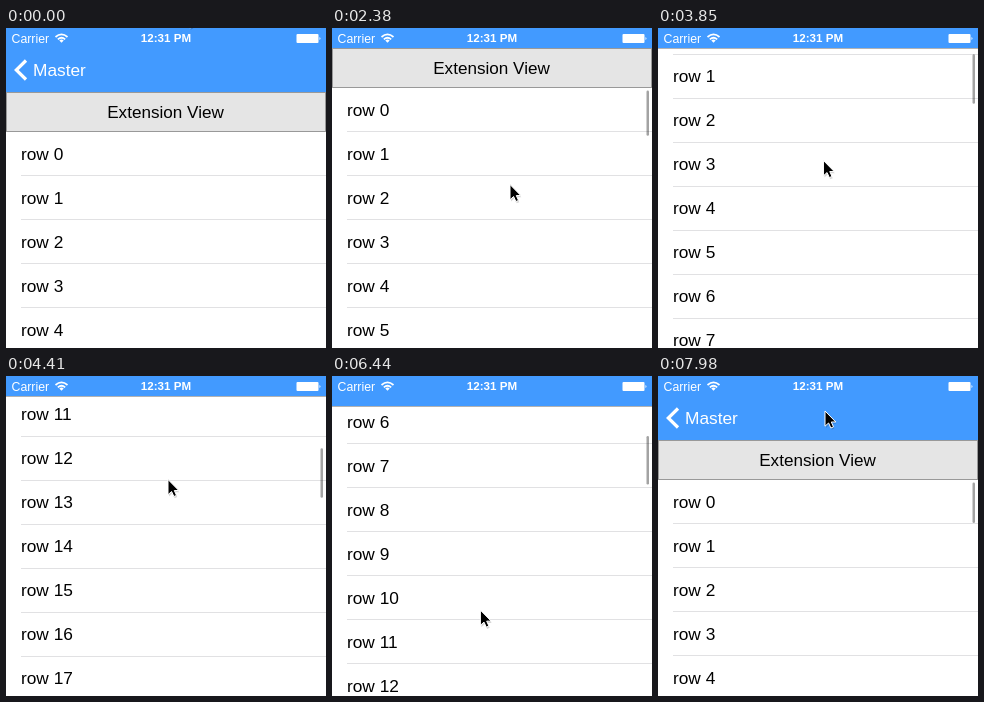
An HTML page that plays this animation: 320x320 px, repeating every 8000 ms.

```html
<!DOCTYPE html>
<html lang="en">
<head>
<meta charset="utf-8">
<title>Collapsing navigation bar</title>
<style>
  html, body { margin: 0; width: 100%; height: 100%; overflow: hidden; background: #fff; }
  svg { display: block; width: 100%; height: 100%; font: 17.3px "Liberation Sans", Arial, sans-serif; }
  .status { font-size: 12.3px; fill: #fff; }
</style>
</head>
<body>
<svg viewBox="0 0 320 320">
  <rect width="320" height="320" fill="#fff"/>
  <g id="lines" stroke="#e1e1e3"></g>
  <g id="labels"></g>
  <rect id="scrollbar" x="314.5" width="2.5" rx="1.25" fill="#000" fill-opacity=".36"/>
  <rect id="hairline" width="320" height="1" fill="#000" fill-opacity=".3"/>
  <g id="extension">
    <rect x=".5" y=".5" width="319" height="39" fill="#e5e5e5" stroke="#999"/>
    <text x="159.5" y="26" text-anchor="middle" font-size="17.1">Extension View</text>
  </g>
  <rect id="navBar" width="320" fill="#429aff"/>
  <g id="navItem" fill="#fff">
    <path d="M20 32.5 10.3 42 20 51.5" fill="none" stroke="#fff" stroke-width="3.2"/>
    <text x="27" y="48">Master</text>
  </g>
  <g class="status">
    <text x="5.5" y="14.5">Carrier</text>
    <text x="160" y="14.3" text-anchor="middle" font-size="11.6" font-weight="bold">12:31 PM</text>
    <path d="M49.5 9Q55.5 3.8 61.5 9M51.8 11.3Q55.5 8.2 59.2 11.3" fill="none" stroke="#fff" stroke-width="1.7"/>
    <path d="M53.3 12.4Q55.5 10.8 57.7 12.4L55.5 14.7Z"/>
    <rect x="290.5" y="6" width="22" height="9" rx="1"/>
    <path d="M313.5 9Q315.5 10.5 313.5 12Z"/>
  </g>
  <g id="cursor">
    <path d="M1 2V17L4.4 13.8 6.7 18.8 9.3 17.6 7 12.8H11.4Z" fill="#000" opacity=".16"/>
    <path d="M0 0V15.2L3.6 12 5.9 17 8.5 15.9 6.3 11H10.8Z" fill="#000" stroke="#fff"/>
  </g>
</svg>
<script>
const LOOP = 8000, STEP = 70, ROW = 44, ROWS = 32, SCREEN = 480;
const BAR = 64, STATUS = 20, EXT = 40;
const RESIST_HIDE = 3.5, RESIST_SHOW = 200;

const clamp = (v, lo = 0, hi = 1) => Math.min(hi, Math.max(lo, v));
const smooth = u => u * u * (3 - 2 * u);
const easeIn = u => u ** 1.5;
const easeOut = u => 1 - (1 - u) ** 3;

// Pointer moves and the scrolling they cause.
const gestures = [
  { from: 140, to: 420, x: 144, y: 297 },
  { from: 700, to: 1540, x: 158, y: 160, scroll: 122.5, ease: easeIn },
  { from: 1540, to: 1680, x: 178, y: 57 },
  { from: 1820, to: 2870, y: 238, scroll: -20 },
  { from: 2870, to: 3360, scroll: 0 },
  { from: 3500, to: 4000, x: 162, y: 103.5 },
  { from: 3500, to: 4954, scroll: 835 },
  { from: 4960, to: 5460, x: 152, y: 370 },
  { from: 4960, to: 6030, scroll: 266.5 },
  { from: 6030, to: 6540, x: 148, y: 219, scroll: 352.7 },
  { from: 6540, to: 6640, scroll: 352.7 },
  { from: 6640, to: 6930, x: 330, y: 200, scroll: 390 },
  { from: 6930, to: 7000, x: 177, y: -19 },
  { from: 7070, to: 7490, x: 170, y: 8 },
  { from: 7630, to: LOOP, x: 167, y: 35, scroll: 0, ease: easeOut }
];

const valueAt = (prop, initial, t) => gestures
  .filter(g => prop in g && t > g.from)
  .reduce((v, { from, to, ease = smooth, [prop]: end }) =>
    v + (end - v) * ease(clamp((t - from) / (to - from))), initial);

// Both directions move the extension first, then the bar.
function collapse(bar, delta) {
  const ext = clamp(bar.ext + delta, 0, EXT);
  const rest = delta - (ext - bar.ext);
  bar.ext = ext;
  bar.nav = clamp(bar.nav + rest, 0, BAR - STATUS);
}

function simulate() {
  const bar = { ext: 0, nav: 0 }, frames = [];
  let hideSlack = RESIST_HIDE, showSlack = RESIST_SHOW, last = 0;
  for (let t = 0; t < LOOP; t += STEP) {
    const scroll = valueAt('scroll', 0, t), delta = scroll - last;
    if (delta > 0 && scroll > 0) {
      const used = Math.min(delta, hideSlack);
      hideSlack -= used;
      showSlack = RESIST_SHOW;
      collapse(bar, delta - used);
    } else if (delta < 0) {
      const used = Math.min(-delta, showSlack);
      showSlack -= used;
      hideSlack = RESIST_HIDE;
      collapse(bar, delta + used);
    }
    // Never leave a gap above the first row.
    collapse(bar, Math.min(0, Math.max(0, scroll) - bar.ext - bar.nav));
    last = scroll;
    frames.push({
      scroll, ext: bar.ext, nav: BAR - bar.nav,
      x: valueAt('x', 178, t), y: valueAt('y', -17, t),
      scrolling: gestures.some(g => 'scroll' in g && t > g.from && t < g.to)
    });
  }
  return frames;
}

const el = id => document.getElementById(id);
const set = (id, attrs) => Object.entries(attrs).forEach(([k, v]) => el(id).setAttribute(k, v));
const moveTo = (id, x, y) => set(id, { transform: `translate(${x} ${y})` });
const eachRow = make => Array.from({ length: ROWS }, (_, i) => make(i, i * ROW)).join('');

el('labels').innerHTML = eachRow((i, y) => `<text x="15" y="${y + 28}">row ${i}</text>`);
el('lines').innerHTML = eachRow((i, y) => `<path d="M15 ${y + 43.5}H320"/>`);

function draw(frame) {
  const nav = Math.round(frame.nav), ext = Math.round(frame.ext);
  const top = BAR + EXT - frame.scroll;
  moveTo('labels', 0, Math.round(top));
  moveTo('lines', 0, Math.ceil(top));
  moveTo('extension', 0, nav - ext);
  set('navBar', { height: nav });
  set('hairline', { y: nav });
  moveTo('navItem', 0, nav - BAR);
  set('navItem', { opacity: clamp((nav - 31) / 15) });

  const inset = nav + EXT - ext, offset = inset - top;
  set('scrollbar', {
    y: inset + 2.5 + Math.max(0, offset) * 0.102,
    height: (SCREEN - inset) * 0.1075 + Math.min(0, offset),
    opacity: +frame.scrolling
  });
  moveTo('cursor', frame.x, frame.y);
}

const frames = simulate(), start = performance.now();
function tick() {
  const t = (performance.now() - start) % LOOP;
  draw(frames[Math.floor(t / STEP)]);
  requestAnimationFrame(tick);
}
tick();
</script>
</body>
</html>
```
